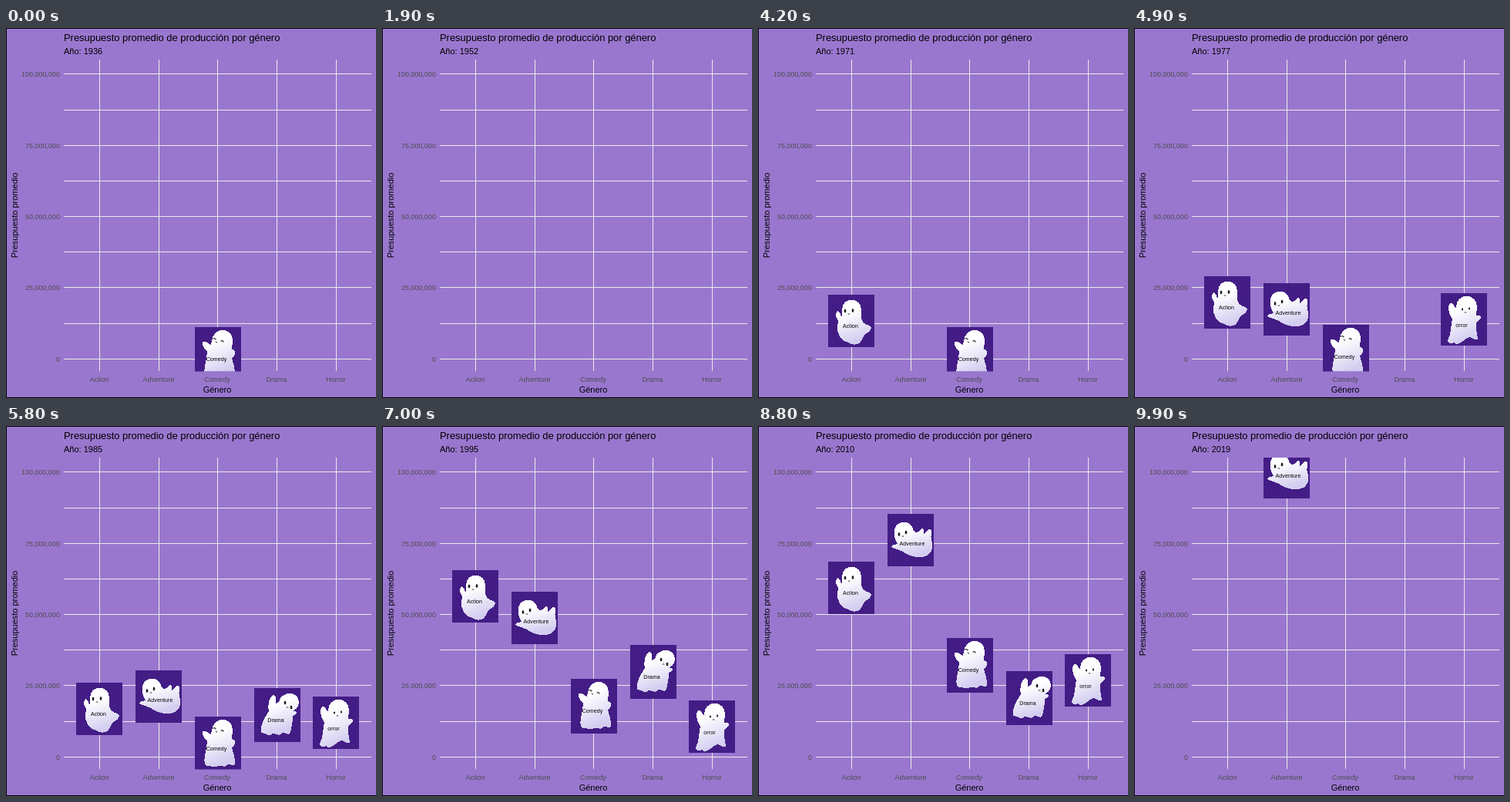
Animation, 480 px wide and 480 px high, one loop 10000 ms. Source, as an HTML page:

```html
<!DOCTYPE html>
<html lang="es">
<head>
<meta charset="utf-8">
<style>
  html, body { margin: 0; width: 100%; height: 100%; overflow: hidden; background: #9a77cf; }
  svg { display: block; font: 11px "Liberation Sans", Arial, sans-serif; }
  .grid { stroke: #ebebeb; shape-rendering: crispEdges; }
  .tick { font-size: 9px; fill: #4d4d4d; }
  .label { font-size: 7px; letter-spacing: .1px; text-anchor: middle; }
  .mid { text-anchor: middle; }
  .end { text-anchor: end; }
  .body { fill: url(#sheet); shape-rendering: crispEdges; }
  .face { fill: none; stroke: #222; stroke-linecap: round; }
</style>
</head>
<body>
<svg id="chart" width="480" height="480" viewBox="0 0 480 480"></svg>
<script>
const FRAMES = 100, STEP = 100, FIRST = 1936, LAST = 2019;

// Budgets in millions at these frames, linear in between.
const KEYS = [0, 34, 49, 58, 70, 88, 99];

// shown: spans of frames in which the genre has films
const genres = [
  { name: 'Action', label: 'Action', at: [29, 43], height: 68, shown: [[31, 98]],
    budgets: [0, 5.8, 19.9, 16.9, 56.4, 59.4, 75],
    body: 'M18 20C18 2 43 2 43 20L43 30C44 40 56 39 56 43C55 50 48 49 46 54C42 66 34 66 28 63C16 60 11 50 12 40C13 36 13 34 12 32C9 28 10 20 13 21C16 23 16 28 18 28Z',
    eyes: 'M22 20v2M32 19.5v2', eyeWidth: 2.6, mouth: 'M26 25q1 1 2 0' },
  { name: 'Adventure', label: 'Adventure', at: [32, 41], height: 68, shown: [[47, 99]],
    budgets: [3, 10, 17.4, 21.2, 48.8, 76.2, 100],
    body: 'M9 27C5 10 30 3 34 22C38 26 40 24 43 20C46 17 48 20 47 26C50 24 53 19 56 20C59 22 55 28 57 34C59 40 60 48 52 54C44 58 28 56 20 49C14 46 6 45 5 42C7 39 12 40 13 39C10 34 9 31 9 27Z',
    eyes: 'M15 25.5v2M24 23v2', eyeWidth: 2.6, mouth: 'M19 29q1 1 2 0' },
  { name: 'Comedy', label: 'Comedy', at: [28, 44], height: 71, shown: [[0, 0], [32, 98]],
    budgets: [1.57, .5, 2.4, 4.5, 17.8, 32.15, 27],
    body: 'M22 18C24-2 50 0 49 18L48 29C54 29 53 38 48 40C50 48 53 56 52 62C49 66 46 60 43 62C38 68 34 62 30 64C24 67 20 63 16 64C11 62 12 54 14 46C15 40 16 34 16 31C11 28 9 22 10 19C13 17 18 22 21 23Z',
    eyes: 'M24 15q2-1 3 1M34 18q2-1 3 1', eyeWidth: 1.3, mouth: 'M27 19q1 2 2 1' },
  { name: 'Drama', label: 'Drama', at: [28, 44], height: 70, shown: [[10, 12], [50, 98]],
    budgets: [4, 4, 11, 14.7, 29.85, 20.65, 20],
    body: 'M32 18C34 4 58 2 58 19C58 26 52 28 50 30C57 29 56 34 50 36C50 46 48 54 46 59C42 62 40 56 36 58C32 64 28 58 24 59C18 64 16 58 9 58C8 46 14 38 19 30C17 22 20 10 25 9C29 10 29 14 28 20Z',
    eyes: 'M40 18v2M48 24v2', eyeWidth: 2.6, mouth: 'M42 25q1-1 2 0' },
  { name: 'Horror', label: 'orror', at: [27, 44], height: 68, shown: [[44, 98]],
    budgets: [2, 4, 13.9, 12, 10.7, 27, 12],
    body: 'M20 18C20-1 47-1 47 18L46 29C54 27 54 34 46 38C45 44 47 52 48 59C46 63 42 58 38 57C34 57 30 62 26 64C22 67 18 66 17 64C14 66 9 65 9 61C14 52 13 40 15 34C10 27 8 16 12 13C16 12 17 17 20 20Z',
    eyes: 'M28 20.5v1M37 19.5v1', eyeWidth: 2, mouth: 'M31 25q1-1 2 0' }
];

const xOf = i => 121.3 + 76.75 * i;
const yOf = millions => 429.35 - 3.695 * millions;
const line = (x1, y1, x2, y2) => `<path class="grid" d="M${x1} ${y1}L${x2} ${y2}"/>`;
const text = (x, y, str, cls = '', extra = '') => `<text x="${x}" y="${y}" class="${cls}" ${extra}>${str}</text>`;

function budgetAt(budgets, frame) {
  const next = Math.max(1, KEYS.findIndex(key => key >= frame));
  const [start, end] = [KEYS[next - 1], KEYS[next]];
  return budgets[next - 1] + (budgets[next] - budgets[next - 1]) * (frame - start) / (end - start);
}

let svg = `<defs>
  <clipPath id="panel"><rect x="75" y="41" width="399" height="404.5"/></clipPath>
  <linearGradient id="sheet" x2="0.3" y2="1"><stop offset=".35" stop-color="#fff"/><stop offset="1" stop-color="#d3cdf0"/></linearGradient>
</defs><rect width="480" height="480" fill="#9a77cf"/>
<path d="M480 .5H.5V479.5H480" fill="none" stroke="#000" shape-rendering="crispEdges"/>`;

for (let v = 0; v <= 100; v += 12.5) {
  const y = Math.floor(yOf(v)) + .5;
  svg += line(75, y, 474, y);
  if (v % 25 === 0) svg += text(70, y + 3.5, (v * 1e6).toLocaleString('en-US'), 'tick end');
}
genres.forEach((g, i) => {
  const x = Math.floor(xOf(i)) + .5;
  svg += line(x, 41, x, 445) + text(x - .5, 459, g.name, 'tick mid');
});
svg += text(75, 17, 'Presupuesto promedio de producción por género', '', 'font-size="13" letter-spacing="-.05"')
  + text(75, 34, '', '', 'id="year"')
  + text(274, 473, 'Género', 'mid')
  + text(0, 0, 'Presupuesto promedio', 'mid', 'transform="translate(15 243) rotate(-90)"')
  + '<g clip-path="url(#panel)">'
  + genres.map(g => `<g class="ghost"><rect width="60" height="${g.height}" fill="#431d85"/>
      <path class="body" d="${g.body}"/>
      <path class="face" d="${g.eyes}" stroke-width="${g.eyeWidth}"/><path class="face" d="${g.mouth}" stroke-width=".9"/>
      ${text(...g.at, g.label, 'label')}</g>`).join('')
  + '</g>';

const chart = document.getElementById('chart');
chart.innerHTML = svg;
const yearText = document.getElementById('year');
const ghosts = chart.querySelectorAll('.ghost');

function draw(now) {
  const frame = Math.floor(now / STEP) % FRAMES;
  yearText.textContent = 'Año: ' + Math.round(FIRST + frame * (LAST - FIRST) / (FRAMES - 1));
  genres.forEach((g, i) => {
    const visible = g.shown.some(([from, to]) => frame >= from && frame <= to);
    const top = Math.round(yOf(budgetAt(g.budgets, frame)) - g.height / 2);
    ghosts[i].style.display = visible ? '' : 'none';
    ghosts[i].setAttribute('transform', `translate(${Math.round(xOf(i) - 30)} ${top})`);
  });
}

const begin = performance.now();
function tick() {
  draw(performance.now() - begin);
  requestAnimationFrame(tick);
}
tick();
</script>
</body>
</html>
```
